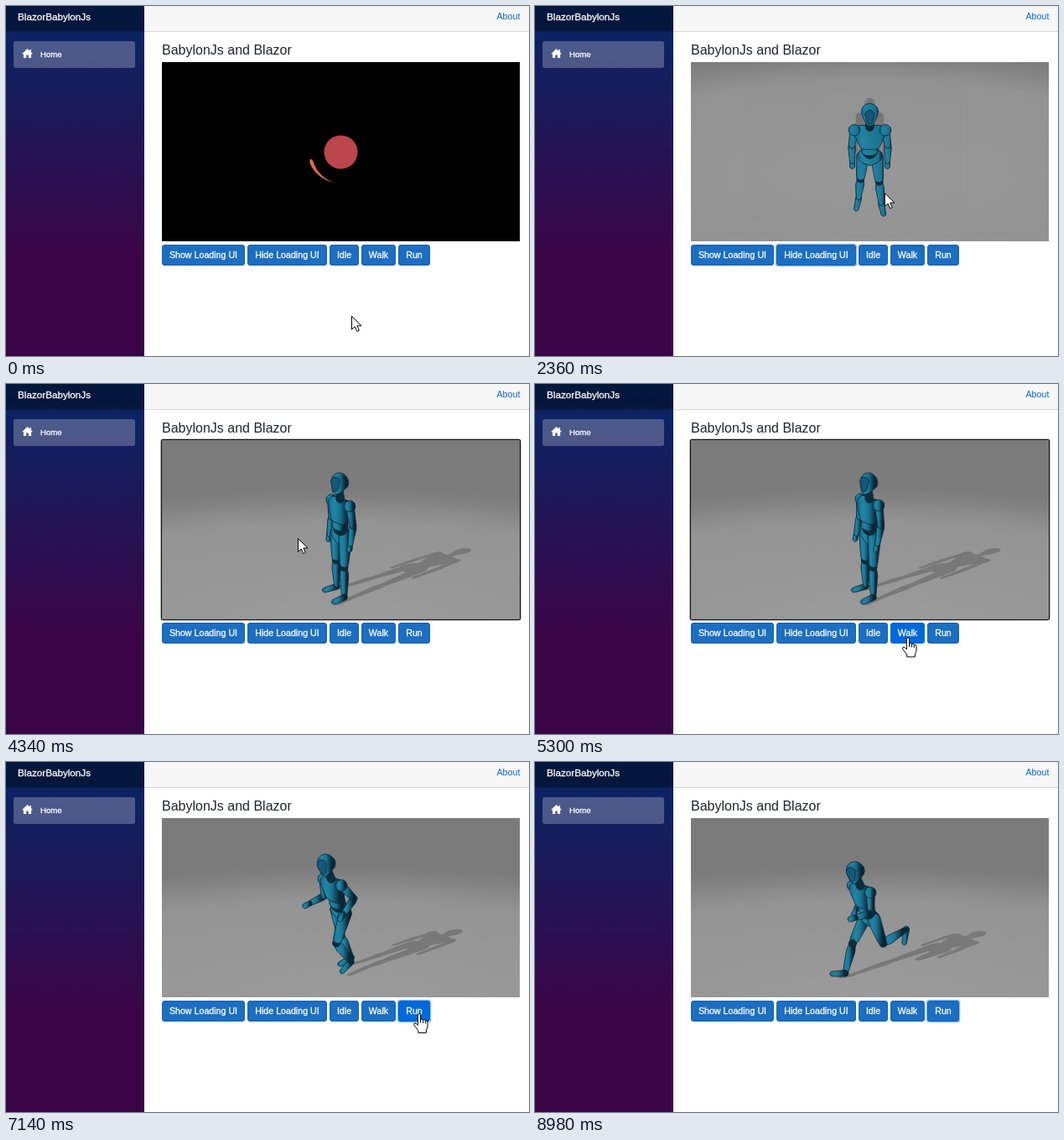
An HTML page that plays this animation: 624x418 px, repeating every 9.04 s.

```html
<!DOCTYPE html>
<html lang="en">
<head>
<meta charset="utf-8">
<title>BabylonJs and Blazor</title>
<style>
html, body { margin: 0; width: 100%; height: 100%; overflow: hidden; background: #fff; }
svg { display: block; width: 100%; height: 100%; }
text { font-family: "Liberation Sans", Arial, sans-serif; }
.bold { fill: #fff; stroke: #fff; stroke-width: .3; }
</style>
</head>
<body>
<svg viewBox="0 0 624 418">
  <defs>
    <linearGradient id="side" x2="0" y2="1">
      <stop stop-color="#052767"/><stop offset=".7" stop-color="#3a0647"/>
    </linearGradient>
    <radialGradient id="ground" gradientUnits="userSpaceOnUse" cx="0" cy="0" r="1">
      <stop stop-color="#9b9b9b"/><stop offset=".75" stop-color="#949494"/><stop offset="1" stop-color="#7b7b7b"/>
    </radialGradient>
    <linearGradient id="skin">
      <stop stop-color="#17698a"/><stop offset=".25" stop-color="#2086a6"/>
      <stop id="mid" stop-color="#1b7390"/><stop id="dark" stop-color="#0a2636"/>
    </linearGradient>
    <clipPath id="view"><rect x="186" y="67" width="427" height="214"/></clipPath>
  </defs>

  <rect width="624" height="418" fill="#fff"/>
  <rect width="165" height="418" fill="url(#side)"/>
  <rect width="165" height="30.5" fill="#000" fill-opacity=".4"/>
  <text class="bold" x="14" y="17" font-size="11.7">BlazorBabylonJs</text>
  <rect x="9" y="42" width="145" height="32" rx="2.7" fill="#fff" fill-opacity=".25"/>
  <path d="M25.5 51L19 57.2H20.9V62H24.2V58.4H26.8V62H30.1V57.2H32L30 55.2V52H28.4V53.7Z" fill="#fff"/>
  <text class="bold" x="41" y="61" font-size="9.6">Home</text>
  <rect x="165" width="459" height="30" fill="#f7f7f7"/>
  <rect x="165" y="30" width="459" height="1" fill="#d6d5d5"/>
  <text x="585.5" y="16" font-size="10.67" fill="#0366d6">About</text>
  <text x="186" y="58" font-size="16" fill="#212529">BabylonJs and Blazor</text>

  <rect id="outline" x="185.5" y="66.5" width="428" height="215" rx="2" fill="none" stroke="#101010" stroke-width="1.6"/>
  <g clip-path="url(#view)">
    <rect x="186" y="67" width="427" height="214" fill="url(#ground)"/>
    <path id="shadow" fill="#787878"/>
    <g id="robot" stroke="#0b2535" stroke-width=".8" stroke-linejoin="round"></g>
    <g id="loader">
      <rect x="186" y="67" width="427" height="214"/>
      <circle cx="399.5" cy="174.5" r="20" fill="#bb464b"/>
      <path id="arc" fill="#e0684b"/>
    </g>
  </g>
  <g id="buttons"></g>
  <path id="arrow" d="M.5 .5V16.3L4.2 12.9L6.8 18.6L9.4 17.4L6.9 11.9H12Z" fill="#fff" stroke="#000"/>
  <path id="hand" d="M-1.6 1.5Q0 -.6 1.6 1.5V7.5Q3.2 6.2 4.6 8Q6.2 7 7.4 8.8Q9.8 8.2 10 11V16Q9.8 18 8.4 20V23.4H-1.2V20.6L-6.4 13.8Q-6.6 11 -4 12L-1.6 14.4ZM1.6 7.5V11.5M4.6 8V12M7.4 8.8V12.4" fill="#fff" stroke="#000" stroke-linejoin="round"/>
</svg>

<script>
const LOOP = 9040, STEP = 73.5;
const CLICK = { hide: 1070, drag: 2950, walk: 5350, run: 6650 };
const BUTTONS = [
  ["Show Loading UI", 186, 99],
  ["Hide Loading UI", 288, 95, CLICK.hide, CLICK.drag],
  ["Idle", 386, 35],
  ["Walk", 424, 41, CLICK.walk, CLICK.run],
  ["Run", 468, 38, CLICK.run, LOOP]
];
// time, x, y
const CURSOR = [
  [0, 412, 370], [250, 412, 370], [960, 342, 300], [1960, 342, 300], [2360, 417, 223],
  [2750, 440, 224], [2980, 440, 224], [3850, 348, 184], [4450, 348, 184], [5150, 445, 302],
  [5600, 445, 304], [6060, 486, 309], [6140, 486, 309], [6350, 488, 318], [6580, 493, 300],
  [7750, 493, 300], [8560, 520, 425]
];
const $ = id => document.getElementById(id);
const set = (el, attrs) => { for (const k in attrs) el.setAttribute(k, attrs[k]); };
const lerp = (a, b, k) => a + (b - a) * k;
const clamp = v => Math.max(0, Math.min(1, v));
const smooth = v => (v = clamp(v)) * v * (3 - 2 * v);
const rad = d => d * Math.PI / 180;
const sin = d => Math.sin(rad(d)), cos = d => Math.cos(rad(d));

$("buttons").innerHTML = BUTTONS.map(([label, x, w]) =>
  `<rect x="${x - 1.3}" y="283.7" width="${w + 2.6}" height="27.6" rx="3.6" fill="#8fc3f5"/>
   <rect x="${x + .5}" y="285.5" width="${w - 1}" height="24" rx="2.5"/>
   <text class="bold" x="${x + w / 2}" y="301" font-size="10.67" text-anchor="middle">${label}</text>`).join("");

function follow(keys, t) {
  let i = keys.findIndex(k => k[0] > t);
  if (i < 0) return keys[keys.length - 1].slice(1);
  const a = keys[i - 1], b = keys[i], k = smooth((t - a[0]) / (b[0] - a[0]));
  return [lerp(a[1], b[1], k), lerp(a[2], b[2], k)];
}

// CSS "ease": solve the Bezier for x, then return y
function ease(x) {
  let lo = 0, hi = 1;
  for (let i = 0; i < 20; i++) {
    const u = (lo + hi) / 2, v = 1 - u;
    if (.75 * v * v * u + .75 * v * u * u + u ** 3 < x) lo = u; else hi = u;
  }
  return .3 * (1 - lo) ** 2 * lo + 3 * (1 - lo) * lo * lo + lo ** 3;
}

// Points are [forward, up, right] in metres
function camera(turn, tilt) {
  const st = sin(turn), ct = cos(turn), se = sin(tilt), ce = cos(tilt);
  return ([f, u, r]) => {
    const x = -f * st - r * ct, z = -f * ct + r * st, y = u - .93;
    const depth = z * ce - y * se, s = 86 * 6 / (6 + depth);
    return [399.5 + s * x, 180 - s * (y * ce + z * se), depth, s];
  };
}

function hull(pts) {
  pts.sort((a, b) => a[0] - b[0] || a[1] - b[1]);
  const half = list => {
    const out = [];
    for (const p of list) {
      for (let n; (n = out.length) > 1;) {
        const a = out[n - 2], b = out[n - 1];
        if ((b[0] - a[0]) * (p[1] - a[1]) - (b[1] - a[1]) * (p[0] - a[0]) > 0) break;
        out.pop();
      }
      out.push(p);
    }
    return out.slice(0, -1);
  };
  const ring = half(pts).concat(half(pts.reverse()));
  return "M" + ring.map(p => p[0].toFixed(1) + " " + p[1].toFixed(1)).join("L") + "Z";
}

const around = fn => Array.from({ length: 12 }, (_, i) => fn(cos(i * 30), sin(i * 30)));

// Angles of one side: thigh, knee, arm, elbow
const idle = (t, side) => [side < 0 ? 6 : -2, 3, -4 + 2 * sin(t * .15), 16];
const walk = p => [4 + 26 * sin(p), 8 + 45 * Math.max(0, cos(p + 20)), -24 * sin(p), 30];
const run = p => [5 + 38 * sin(p), 15 + 70 * Math.max(0, cos(p + 30)), -25 - 40 * sin(p), 85];

function build(t) {
  const w = smooth((t - CLICK.walk) / 220), r = smooth((t - CLICK.run) / 220);
  const mix = (a, b, c) => lerp(lerp(a, b, w), c, r);
  const walkP = 90 + (t - 6100) * 360 / 1050, runP = 30 + (t - 7140) * 360 / 655;
  const lean = mix(1, 5, 18), spread = mix(.06, .01, 0);
  const parts = [];
  const add = (fill, ...balls) => parts.push({ fill, balls });
  const SKIN = "url(#skin)", JOINT = "#0d2c3c";

  const sides = [-1, 1].map(s => {
    const half = s < 0 ? 0 : 180;
    const a = idle(t, s), b = walk(walkP + half), c = run(runP + half);
    const [thigh, knee, arm, elbow] = a.map((v, i) => mix(v, b[i], c[i]));
    const go = ([f, u, l], ang, len, out = 0) => [f + len * sin(ang), u - len * cos(ang), l + s * out];
    const shin = thigh - knee, hip = [0, 0, s * .1];
    const kneeP = go(hip, thigh, .43, spread * .6), ankle = go(kneeP, shin, .42, spread * .6);
    const heel = go(ankle, shin, .03), toe = go(heel, 90 + shin * .7, .2, .03);
    return { s, go, arm, elbow, hip, kneeP, ankle, heel, toe };
  });
  const low = Math.min(...sides.flatMap(o => [o.heel[1] - .045, o.toe[1] - .035]));
  const base = mix(0, 0, .015 + .015 * cos(2 * runP)) - low;
  const lift = p => [p[0], p[1] + base, p[2]];
  const body = (h, f, l) => [h * sin(lean) + f * cos(lean), base + h * cos(lean) - f * sin(lean), l];
  const breath = mix(.006 * sin(t * .15), 0, 0);

  for (const o of sides) {
    const [hip, knee, ankle, heel, toe] = [o.hip, o.kneeP, o.ankle, o.heel, o.toe].map(lift);
    add(JOINT, [knee, .055]);
    add(SKIN, [hip, .09], [o.go(hip, 0, 0), .09], [knee.map((v, i) => lerp(hip[i], v, .86)), .062]);
    const calf = knee.map((v, i) => lerp(v, ankle[i], .3));
    add(SKIN, [knee.map((v, i) => lerp(v, ankle[i], .1)), .05], [calf, .062], [ankle, .038]);
    add(SKIN, [heel, .045], [toe, .035]);

    const shoulder = body(.47 + breath, 0, o.s * .205);
    const elbow = o.go(shoulder, o.arm, .27, .04), fore = o.arm + o.elbow;
    const wrist = o.go(elbow, fore, .25), fist = o.go(wrist, fore, .08);
    add(JOINT, [elbow, .042]);
    add(SKIN, [shoulder, .055], [elbow, .043]);
    add(SKIN, [elbow.map((v, i) => lerp(v, wrist[i], .15)), .05], [wrist, .034]);
    add(SKIN, [wrist, .032], [fist, .036]);
    add(SKIN, [shoulder, .075]);
  }
  add(SKIN, [body(.02, 0, -.07), .1], [body(.02, 0, .07), .1], [body(-.06, 0, 0), .075]);
  add(JOINT, [body(.1, 0, 0), .1], [body(.24, 0, 0), .105]);
  add(SKIN, [body(.15, .03, -.04), .075], [body(.15, .03, .04), .075]);
  add(SKIN, [body(.45 + breath, .01, -.13), .085], [body(.45 + breath, .01, .13), .085],
    [body(.27, .02, -.06), .09], [body(.27, .02, .06), .09]);
  add(JOINT, [body(.52, 0, 0), .055], [body(.62, .01, 0), .05]);
  add(SKIN, [body(.77, .01, 0), .108], [body(.74, -.02, 0), .1], [body(.65, .06, 0), .055]);
  add("#14587a", [body(.77, .075, 0), .06], [body(.67, .085, 0), .035]);
  return parts;
}

function drawRobot(t) {
  const k = smooth((t - 2990) / 1050);
  const see = camera(53 * k, lerp(40, 20, k));
  const parts = build(t);
  set($("ground"), {
    gradientTransform: `translate(400 ${lerp(200, 290, k)}) scale(${lerp(480, 600, k)} ${lerp(150, 165, k)})`
  });
  set($("mid"), { offset: lerp(.85, .48, k) });
  set($("dark"), { offset: lerp(1, .8, k) });

  // The light falls from the front, so shadows stretch backwards
  set($("shadow"), {
    d: parts.map(p => hull(p.balls.flatMap(([[f, u, l], r]) =>
      around((c, s) => see([f - 1.66 * u + c * r * 1.94, 0, l + s * r]))))).join("")
  });
  for (const p of parts) {
    const balls = p.balls.map(([c, r]) => [see(c), r]);
    p.depth = balls.reduce((sum, b) => sum + b[0][2], 0) / balls.length;
    p.d = hull(balls.flatMap(([[x, y, , s], r]) => around((c, n) => [x + c * r * s, y + n * r * s])));
  }
  parts.sort((a, b) => b.depth - a.depth);
  $("robot").innerHTML = parts.map(p => `<path d="${p.d}" fill="${p.fill}"/>`).join("");
}

function drawLoader(t) {
  const fade = 1 - ease(clamp((t - CLICK.hide) / 1500));
  set($("loader"), { opacity: fade });
  const head = 166 + t * 360 / 690, edge = [[], []];
  for (let i = 0; i <= 16; i++) {
    const u = i / 16, half = 2.6 * Math.min(1, Math.sqrt(u * 8)) * (1 - u);
    [half, -half].forEach((h, j) => {
      const a = head + 2 - 66 * u;
      edge[j].push((399.5 + (37 + h) * cos(a)).toFixed(2) + " " + (174.5 + (37 + h) * sin(a)).toFixed(2));
    });
  }
  set($("arc"), { d: "M" + edge[0].concat(edge[1].reverse()).join("L") + "Z" });
}

function drawPage(t) {
  const [x, y] = follow(CURSOR, t);
  const over = (b, bottom) => x >= b[1] && x < b[1] + b[2] && y >= 285 && y < bottom;
  const nodes = $("buttons").children;
  BUTTONS.forEach((b, i) => {
    const hover = over(b, 308);
    set(nodes[i * 3], { opacity: t >= b[3] && t < b[4] ? 1 : 0 });
    set(nodes[i * 3 + 1], { fill: hover ? "#0069d9" : "#1b6ec2", stroke: hover ? "#0062cc" : "#1861ac" });
  });
  const hand = BUTTONS.some(b => over(b, 313)), at = `translate(${x.toFixed(1)} ${y.toFixed(1)})`;
  set($("hand"), { transform: at, opacity: hand ? 1 : 0 });
  set($("arrow"), { transform: at, opacity: hand ? 0 : 1 });
  set($("outline"), { opacity: t >= CLICK.drag && t < CLICK.walk ? 1 : 0 });
}

function render(now) {
  const t = Math.floor((now % LOOP + 14) / STEP) * STEP;
  drawRobot(t);
  drawLoader(t);
  drawPage(t);
}

const start = performance.now();
function tick() {
  render(performance.now() - start);
  requestAnimationFrame(tick);
}
tick();
</script>
</body>
</html>
```
